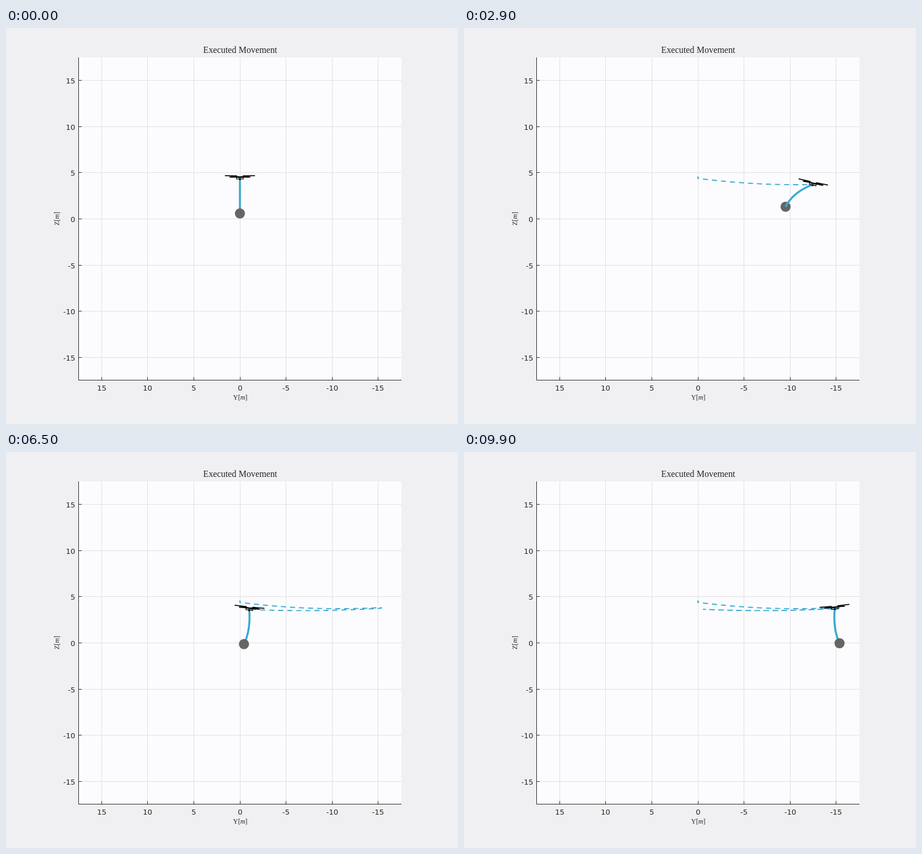
Recreate the animation shown at these times as an HTML page with a canvas. Size 800 by 700 pixels, loop 10 s.

```html
<!DOCTYPE html>
<html lang="en">
<head>
<meta charset="utf-8">
<title>Executed Movement</title>
<style>
html, body { margin: 0; width: 100%; height: 100%; overflow: hidden; background: #f0f0f2; }
canvas { display: block; }
</style>
</head>
<body>
<canvas id="stage" width="800" height="700"></canvas>
<script>
const c = document.getElementById('stage').getContext('2d');
const { PI, sin, cos, tanh, sqrt, hypot, floor } = Math;
const INK = '#262626', BLUE = '#3aa9d0', BALL = '#656563', BLACK = '#080804';
const LIFTOFF = .74, CABLE = 62, SWING = 56;
const turns = [LIFTOFF, 3.76, 6.85, 10.3]; // seconds at which the drone reverses

const clamp = (v, lo, hi) => Math.min(hi, Math.max(lo, v));

// Each leg between two turns adds half a cycle
function phase(t) {
  const leg = t < turns[1] ? 0 : t < turns[2] ? 1 : 2;
  return PI * (leg + (t - turns[leg]) / (turns[leg + 1] - turns[leg]));
}

function hub(t) {
  const p = Math.max(0, phase(t)), outbound = p < PI;
  const left = outbound ? 414 : 423, right = 664;
  const x = right - (right - left) / 2 * (1 + cos(p)), u = (x - 414) / 250;
  const sag = outbound ? 277 - 11.2 * (1 - u / .7) ** 2 : 280.4 - 14 * (u - .45) ** 2;
  return [x, sag - 3.5 * sin(PI * Math.min(1, t / LIFTOFF))];
}

// The load lags behind the drone on a taut cable and swings past it at the turns
function load(t, x, y) {
  const lead = clamp(.15 * t - .42, .1, .45);
  const dx = -SWING * clamp((t - .8) / 1.2, 0, 1) * tanh(1.8 * sin(phase(t) + lead));
  return [x + dx, y + sqrt(CABLE ** 2 - dx ** 2)];
}

const tilt = t => .59 * sin(Math.max(0, phase(t) + .53));
const bow = t => 6 * sin(Math.max(0, phase(t) - .4));

function line(points, color, width, dash = []) {
  c.strokeStyle = color;
  c.lineWidth = width;
  c.setLineDash(dash);
  c.beginPath();
  points.forEach(p => c.lineTo(...p));
  c.stroke();
}

function disc(x, y, r, color) {
  c.fillStyle = color;
  c.beginPath();
  c.arc(x, y, r, 0, 7);
  c.fill();
}

function text(str, x, y, font, align) {
  c.font = font;
  c.textAlign = align;
  c.fillStyle = INK;
  c.fillText(str, x, y);
}

function axisLabel(name, x, y, angle) {
  const serif = '12px "Liberation Serif", serif';
  c.save();
  c.translate(x, y);
  c.rotate(angle);
  let pen = -12.5;
  for (const s of [name + '[', 'm', ']']) {
    text(s, pen, 0, s === 'm' ? 'italic ' + serif : serif, 'left');
    pen += c.measureText(s).width;
  }
  c.restore();
}

function drawAxes() {
  const sans = '13px "DejaVu Sans", sans-serif', values = [-15, -10, -5, 0, 5, 10, 15];
  const px = v => floor(414.1 - v * 16.32) + .5, py = v => floor(337.4 - v * 16.32) + .5;
  c.fillStyle = '#f0f0f2';
  c.fillRect(0, 0, 800, 700);
  c.fillStyle = '#fcfcfe';
  c.fillRect(129, 52, 571, 570);
  for (const v of values) {
    line([[px(v), 52], [px(v), 622]], '#e0e0e3', 1);
    line([[129, py(v)], [700, py(v)]], '#e0e0e3', 1);
  }
  for (const v of values) {
    line([[px(v), 617], [px(v), 622]], INK, 1);
    line([[129, py(v)], [134, py(v)]], INK, 1);
    text(v, px(v), 641, sans, 'center');
    text(v, 122.5, py(v) + 5, sans, 'right');
  }
  line([[128.5, 52], [128.5, 622.5], [700, 622.5]], INK, 1);
  text('Executed Movement', 414.5, 44, '15.75px "Liberation Serif", serif', 'center');
  axisLabel('Y', 414.5, 657, 0);
  axisLabel('Z', 94, 336.5, -PI / 2);
}

function drawRope(x, y, lx, ly, bend) {
  const dx = lx - x, dy = ly - y, k = 2 * bend / hypot(dx, dy);
  c.strokeStyle = BLUE;
  c.lineWidth = 3.5;
  c.setLineDash([]);
  c.beginPath();
  c.moveTo(x, y);
  c.quadraticCurveTo(x + dx * .58 - dy * k, y + dy * .58 + dx * k, lx, ly);
  c.stroke();
}

function drawDrone(x, y, angle) {
  c.save();
  c.translate(x, y);
  c.rotate(angle);
  for (const side of [-1, 1]) {
    line([[side * 26.5, -4.7], [side * 5, -4.4]], BLACK, 1.7);
    line([[side * 18.5, -2.3], [side * 8, -2.5], [0, -1.6]], BLACK, 2);
    line([[side * 16, -4], [0, -2.8]], BLACK, 1.4);
  }
  line([[-6, -2], [-6, 1], [6, 1], [6, -2]], BLACK, 1.3);
  disc(0, 1.3, 1.8, BLACK);
  c.restore();
}

function draw(t) {
  const [x, y] = hub(t), [lx, ly] = load(t, x, y);
  const path = Array.from({ length: Math.round(t * 50) + 1 }, (_, i) => hub(i / 50));
  const ball = () => disc(lx, ly, 9, BALL);
  const ropeInFront = x - lx > 20;
  drawAxes();
  line(path, BLUE, 1.9, [9, 7]);
  if (ropeInFront) ball();
  drawRope(x, y, lx, ly, bow(t));
  if (!ropeInFront) ball();
  drawDrone(x, y, tilt(t));
}

const start = performance.now();
let shown = -1;
function tick() {
  const step = floor((performance.now() - start) % 10000 / 100);
  if (step !== shown) draw(step / 10);
  shown = step;
  requestAnimationFrame(tick);
}
tick();
</script>
</body>
</html>
```
